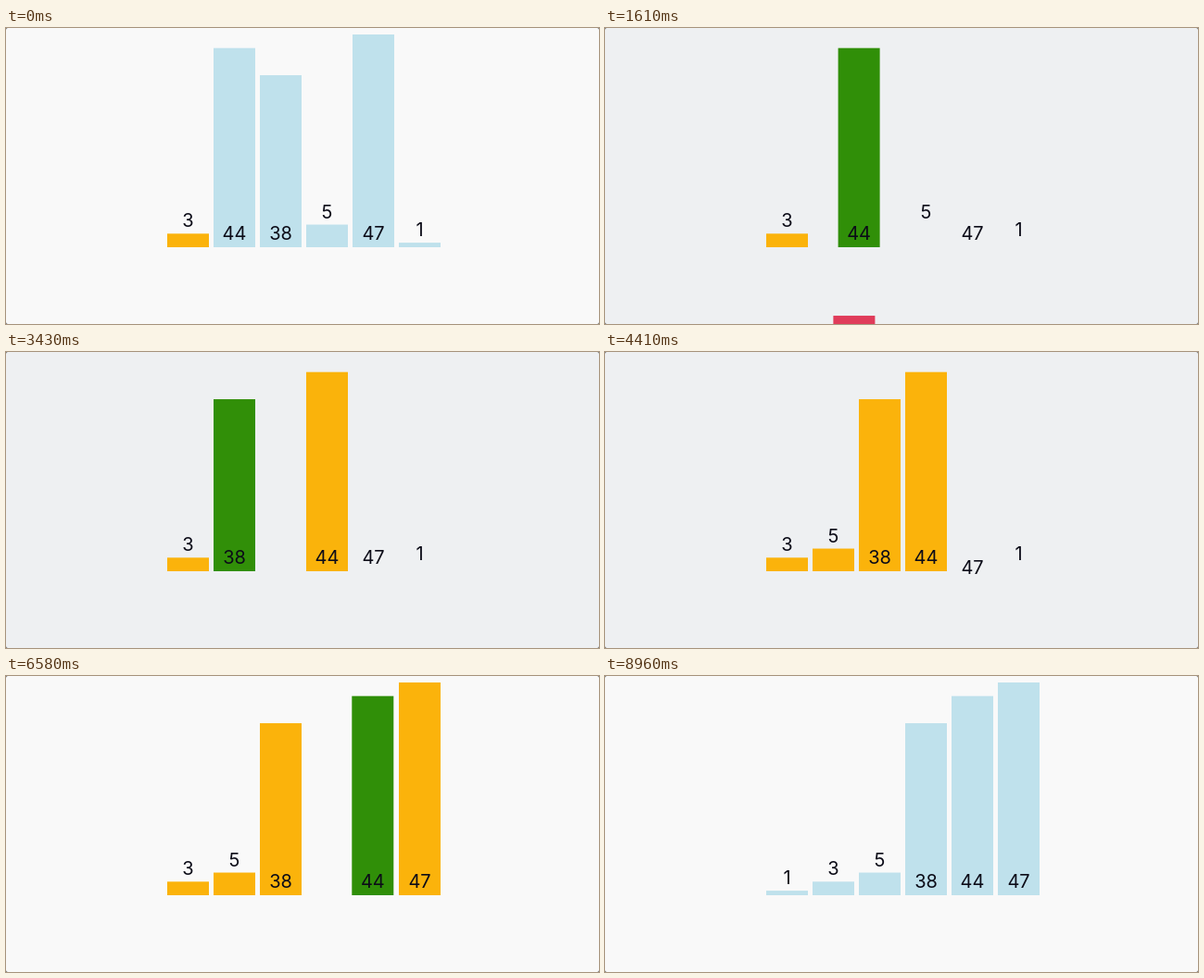
Recreate the animation shown at these times as an HTML page with a canvas. Size 640 by 320 pixels, loop 9.31 s.

```html
<!DOCTYPE html>
<html lang="en">
<head>
<meta charset="utf-8">
<title>Insertion sort</title>
<style>
  html, body { margin: 0; width: 100%; height: 100%; overflow: hidden; background: #555; }
  canvas { display: block; }
</style>
</head>
<body>
<canvas id="stage" width="640" height="320"></canvas>
<script>
const ctx = document.getElementById('stage').getContext('2d');

const LOOP = 9310, TICK = 70;
const FIRST_STEP = 43, STEP = 287.5, MOVE = 250;
const LEFT = 174, PITCH = 50, BAR_WIDTH = 45, BASE = 237, UNIT = 230 / 47, DROP = 260;
const BLUE = [191, 225, 236], ORANGE = [251, 179, 11], GREEN = [48, 143, 8], RED = [224, 60, 90];
// In this span the background is greyer and unsorted bars blend into it.
const GREY_FROM = 1050, GREY_TO = 5460;

const values = [3, 44, 38, 5, 47, 1];

// Runs the sort and records the pose of every bar after each step.
function recordSteps() {
  const bars = values.map((value, slot) => ({ value, slot, low: 0, color: BLUE }));
  const order = [...bars];
  const steps = [];
  const record = () => steps.push(bars.map(bar => ({ ...bar })));

  bars[0].color = ORANGE;
  record();
  for (let i = 1; i < order.length; i++) {
    const picked = order[i];
    Object.assign(picked, { low: 1, color: RED });
    record();
    let compared;
    for (let j = i - 1; j >= 0; j--) {
      if (compared) compared.color = ORANGE;
      compared = order[j];
      compared.color = GREEN;
      record();
      if (compared.value < picked.value) break;
      order[j] = picked;
      order[j + 1] = compared;
      picked.slot = j;
      compared.slot = j + 1;
      record();
    }
    compared.color = ORANGE;
    Object.assign(picked, { low: 0, color: ORANGE });
    record();
  }
  bars.forEach(bar => bar.color = BLUE);
  record();
  return steps;
}

const steps = recordSteps();
const clamp = (x, min, max) => Math.min(max, Math.max(min, x));
const mix = (a, b, p) => a + (b - a) * p;
const ease = t => t < 0.5 ? 4 * t ** 3 : 1 - 4 * (1 - t) ** 3;

function drawBar(from, to, p, grey) {
  const x = LEFT + PITCH * mix(from.slot, to.slot, p);
  const drop = DROP * mix(from.low, to.low, p);
  const height = from.value * UNIT;
  const top = BASE - height + drop;
  const hidden = grey && (p < 0.5 ? from : to).color === BLUE;

  if (!hidden) {
    ctx.fillStyle = `rgb(${from.color.map((c, i) => mix(c, to.color[i], p))})`;
    ctx.fillRect(x, top, BAR_WIDTH, height);
  }
  ctx.fillStyle = '#0c0c18';
  const baseline = from.value < 10 ? top - 7 : BASE + drop - 7.7;
  ctx.fillText(from.value, x + BAR_WIDTH / 2, baseline);
}

function draw(time) {
  const grey = time >= GREY_FROM && time < GREY_TO;
  ctx.clearRect(0, 0, 640, 320);
  ctx.fillStyle = grey ? '#eef0f2' : '#f9f9f9';
  ctx.beginPath();
  ctx.roundRect(0, 0, 640, 320, 2);
  ctx.fill();

  const elapsed = Math.max(0, time - FIRST_STEP);
  const index = Math.min(Math.floor(elapsed / STEP), steps.length - 2);
  const p = ease(clamp((elapsed - index * STEP) / MOVE, 0, 1));
  ctx.font = '20px Inter, Arial, sans-serif';
  ctx.textAlign = 'center';
  steps[index].forEach((bar, i) => drawBar(bar, steps[index + 1][i], p, grey));
}

const start = performance.now();
function frame() {
  const time = (performance.now() - start) % LOOP;
  draw(Math.floor(time / TICK) * TICK);
  requestAnimationFrame(frame);
}
frame();
</script>
</body>
</html>
```
